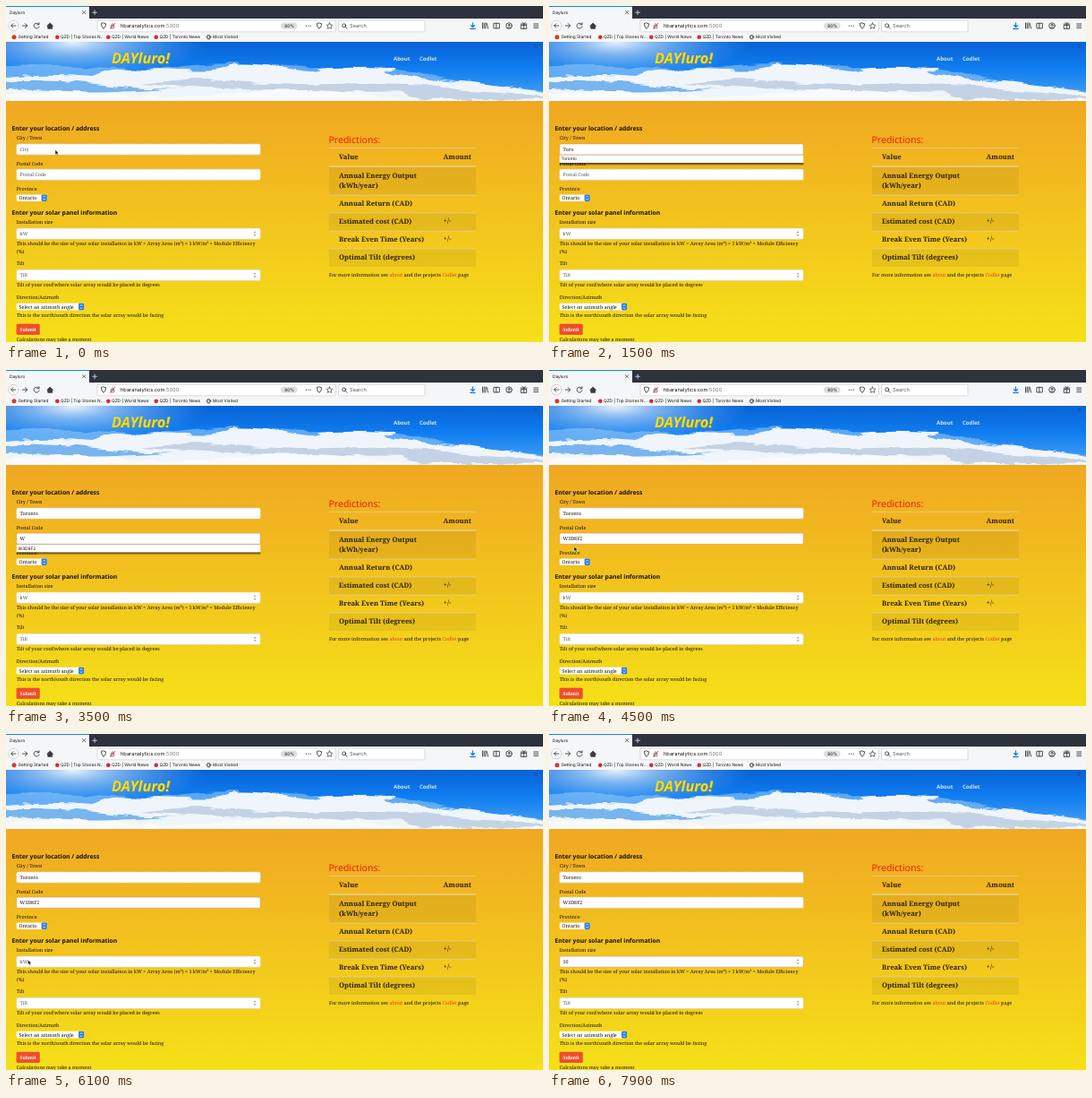
An HTML page for the animation above (8000 ms loop, 600x375 px).

```html
<!DOCTYPE html>
<html lang="en">
<head>
<meta charset="utf-8">
<title>Solar form</title>
<style>
html, body { margin: 0; width: 100%; height: 100%; overflow: hidden; }
svg { display: block; width: 600px; height: 375px; }
text { text-rendering: geometricPrecision; white-space: pre; fill: #15100a; }
.ui { font: 4.75px Inter, sans-serif; }
.url { font-size: 5.7px; }
.body { font: 5.42px "Noto Serif", serif; }
.hint { fill: #54595f; }
.table { font: bold 7.65px "Noto Serif", serif; fill: #2b2009; }
.head { font: bold 6.8px "Noto Sans", sans-serif; }
.nav { font: bold 6.05px "Noto Sans", sans-serif; fill: #cfe3f6; }
.logo { font: italic bold 16.3px "Noto Sans", sans-serif; fill: #f0dc20; text-shadow: .6px .6px .6px #7d8c60; }
.result { font: 500 10.5px "Noto Sans", sans-serif; fill: #f81808; }
.link { fill: #f0381a; }
.icon { fill: none; stroke: #3c3c40; stroke-width: .9; stroke-linecap: round; stroke-linejoin: round; }
</style>
</head>
<body>
<svg id="stage" viewBox="0 0 600 375">
  <defs>
    <linearGradient id="sun" x2="0" y2="1">
      <stop stop-color="#f0a822"/><stop offset="1" stop-color="#f5e018"/>
    </linearGradient>
    <linearGradient id="sky" x2="0" y2="1">
      <stop stop-color="#0862d6"/><stop offset=".45" stop-color="#0f7df0"/><stop offset="1" stop-color="#4ba4f6"/>
    </linearGradient>
    <radialGradient id="glare">
      <stop stop-color="#fff" stop-opacity=".9"/><stop offset=".3" stop-color="#cfe8fd" stop-opacity=".6"/>
      <stop offset="1" stop-color="#6fb8fa" stop-opacity="0"/>
    </radialGradient>
    <linearGradient id="shade" x2="0" y2="1">
      <stop stop-color="#201c14" stop-opacity=".85"/><stop offset="1" stop-color="#201c14" stop-opacity="0"/>
    </linearGradient>
    <filter id="puff" x="-5%" y="-30%" width="110%" height="160%">
      <feTurbulence type="fractalNoise" baseFrequency=".03 .11" numOctaves="4" seed="8"/>
      <feDisplacementMap in="SourceGraphic" scale="9" xChannelSelector="R" yChannelSelector="G"/>
      <feGaussianBlur stdDeviation=".6"/>
    </filter>
    <clipPath id="banner"><path d="M0 40H600V106H0Z"/></clipPath>
  </defs>

  <!-- browser frame -->
  <path fill="#2d323c" d="M0 0H600V14H0Z"/>
  <path fill="#f5f6f7" d="M0 1H93V14H0ZM0 14H600V40H0Z"/>
  <path fill="#0a84ff" d="M0 0H93V1H0Z"/>
  <g class="icon">
    <path d="M85.5 5.5l3.4 3.4m0-3.4l-3.4 3.4" stroke-width=".7"/>
    <path d="M96.8 7.2h4.6m-2.3-2.3v4.6" stroke="#d8d8dc"/>
    <circle cx="8.3" cy="22" r="5.7" fill="#fff" stroke="#b9b9bd" stroke-width=".6"/>
    <path d="M11 22H5.8m2.3-2.4L5.7 22l2.4 2.4"/>
    <path d="M18.5 22h5.2m-2.3-2.4l2.4 2.4-2.4 2.4"/>
    <path d="M36.6 20.3a3 3 0 1 0 .5 2.6M37 18.7v2.1h-2.2"/>
    <path d="M45.9 22.3l3.3-3.2 3.3 3.2M46.8 22.2v3h4.8v-3" fill="#3c3c40"/>
    <rect x="102" y="16" width="266.5" height="12.8" rx="1.5" fill="#fff" stroke="#c5c5ca" stroke-width=".6"/>
    <rect x="371.5" y="16" width="96.5" height="12.8" rx="1.5" fill="#fff" stroke="#c5c5ca" stroke-width=".6"/>
    <path id="shield" d="M109 19l2.6.8q0 3.8-2.6 5.6-2.6-1.8-2.6-5.6z"/>
    <use href="#shield" x="241"/>
    <path d="M117.4 22h3.4v2.8h-3.4zm.6 0v-1.4q1.1-1.8 2.2 0V22" stroke="#77777c"/>
    <path d="M116.8 25.2l4.8-5.8" stroke="#e02030"/>
    <rect x="307" y="18.5" width="18.5" height="7.2" rx="3.6" fill="#dfdfe3" stroke="none"/>
    <path d="M335.5 22.2h0m2.4 0h0m2.4 0h0" stroke-width="1.3"/>
    <path d="M361.5 18.8l1 2.2 2.4.3-1.8 1.6.5 2.4-2.1-1.2-2.1 1.2.5-2.4-1.8-1.6 2.4-.3z" stroke-width=".7"/>
    <path d="M379.3 23.5l1.7 1.7"/><circle cx="377.7" cy="21.8" r="2"/>
    <path d="M521.5 18.8v4.7m-2-2l2 2 2-2M518.8 25.4h5.4" stroke="#0a78e8" stroke-width="1.1"/>
    <path d="M532.5 19v6m1.7-6v6m1.7-6v6m1.2-5.8l1.5 5.8"/>
    <path d="M545.3 19.3h6v5.6h-6zm2.5 0v5.6"/>
    <circle cx="562" cy="22.1" r="3.3"/><circle cx="562" cy="21.3" r=".9"/>
    <path d="M560.1 24.4q1.9-1.8 3.8 0"/>
    <path d="M575.6 21.4h6v4h-6zm-.4-1.3h6.8M578.6 20v5.4m0-5.6l-1.6-1.3m1.6 1.3l1.6-1.3"/>
    <path d="M589.7 20h5m-5 2.2h5m-5 2.2h5"/>
    <circle cx="226.5" cy="34.7" r="1.7"/><circle cx="226.5" cy="34.7" r="2.5" stroke-dasharray="1 .96" stroke-linecap="butt"/>
  </g>
  <circle cx="9" cy="34.7" r="2.5" fill="#d9382a"/>
  <g fill="#d9272e"><circle cx="57.3" cy="34.7" r="2.3"/><circle cx="114.3" cy="34.7" r="2.3"/><circle cx="167.8" cy="34.7" r="2.3"/></g>

  <!-- sky banner -->
  <path fill="url(#sun)" d="M0 106H600V375H0Z"/>
  <g clip-path="url(#banner)">
    <path fill="url(#sky)" d="M0 40H600V106H0Z"/>
    <ellipse cx="75" cy="41" rx="150" ry="42" fill="url(#glare)"/>
    <g filter="url(#puff)">
      <path fill="#8fc6f8" opacity=".6" d="M-10 68Q40 64 100 68T200 67 300 66 390 68 470 77 610 95V115H-10Z"/>
      <path fill="#f0f5fb" d="M-10 80Q40 74 95 79L120 72Q160 69 200 71T250 67 310 69 350 72 395 68 430 72 460 80 510 84 560 90 610 97V115H-10Z"/>
      <path fill="#5ba6ec" opacity=".8" d="M-10 87Q40 80 100 87T190 92Q100 99 50 95T-10 97Z"/>
      <path fill="#b4c8de" opacity=".75" d="M150 87Q210 79 270 84T400 86 510 95Q400 99 290 94T150 87ZM440 96Q520 91 600 102V106H470Z"/>
      <path fill="#f8fafc" d="M-10 99Q70 94 130 99T270 97 400 99 610 104V115H-10Z"/>
    </g>
    <path stroke="#173a66" stroke-width=".8" d="M590 43.8h1.6m1 0h1.6m-2.6 2.2h1.6"/>
  </g>

  <!-- results table -->
  <path fill="#000" fill-opacity=".06" d="M361 180H525V211H361ZM361 231H525V251H361ZM361 271H525V291H361Z"/>
  <path stroke="#e0d6bd" stroke-width=".6" d="M361 158.4H525M361 211H525M361 231H525M361 251H525M361 271H525"/>
  <path stroke="#e0dccb" stroke-width="1.1" d="M361 179H525"/>
  <g id="page"></g>
  <g id="menu">
    <rect x="11.8" y="8.8" width="272.6" height="3.4" fill="url(#shade)"/>
    <rect x="11.8" width="272.4" height="8.8" fill="#fff"/>
    <path stroke="#8a8578" stroke-width=".4" d="M11.8 0H284.2"/>
    <text id="option" class="ui" x="13.5" y="6"></text>
  </g>
  <path id="arrow" fill="#111" stroke="#fff" stroke-width=".45" d="M0 0V5.4L1.3 4.3 2.2 6.4 3.2 6 2.3 3.9H4Z"/>
  <path id="beam" class="icon" stroke-width=".6" d="M-1.2-3.4Q0-3.4 0-2.5V2.5Q0 3.4-1.2 3.4M1.2-3.4Q0-3.4 0-2.5M0 2.5Q0 3.4 1.2 3.4M-.8 1H.8"/>
</svg>
<script>
const $ = id => document.getElementById(id);
const page = $("page");

function add(tag, attrs, content = "") {
  const el = document.createElementNS("http://www.w3.org/2000/svg", tag);
  for (const key in attrs) el.setAttribute(key, attrs[key]);
  el.innerHTML = content;
  page.append(el);
  return el;
}
const write = (cls, x, y, content) => add("text", { class: cls, x, y }, content);

function field(y, hint, spinner) {
  const box = add("rect", { x: 11.8, y, width: 272.4, height: 12.2, rx: 1.5, fill: "#fff", "stroke-width": .6 });
  if (spinner) add("path", { d: `M276.6 ${y + 5.2}l1.5-2 1.5 2zm0 1.9l1.5 2 1.5-2z`, fill: "#a0a0a0" });
  const label = write("body", 15.5, y + 7.9, hint);
  return (value, focused) => {
    label.textContent = value || hint;
    label.setAttribute("class", value ? "body" : "body hint");
    box.setAttribute("stroke", focused ? "#d98f62" : "#d8cfb8");
  };
}

function select(y, width, value) {
  add("rect", { x: 11.8, y, width, height: 7.6, rx: 1.4, fill: "#fff" });
  const x = 11.8 + width - 6.2;
  add("rect", { x, y, width: 6.2, height: 7.6, rx: 1.4, fill: "#2f7de0" });
  add("path", { d: `M${x + 1.8} ${y + 3.1}l1.3-1.5 1.3 1.5m-2.6 1.5l1.3 1.5 1.3-1.5`, fill: "none", stroke: "#fff", "stroke-width": .7 });
  write("body", 14.6, y + 5.7, value).style.fontWeight = 500;
}

// browser labels
write("ui", 4, 9, "Dayluro");
write("ui url", 128, 24.2, 'hbaranalytics.com<tspan fill="#77777c">:5000</tspan>');
write("ui", 311.3, 23.8, "80%");
write("ui url hint", 384, 24.2, "Search");
[[13.4, "Getting Started"], [61, "QZD | Top Stories N..."], [118, "QZD | World News"],
 [171.5, "QZD | Toronto News"], [231, "Most Visited"]].forEach(([x, s]) => write("ui", x, 36.4, s));

// banner labels
write("logo", 118, 64.3, "DAYluro!");
write("nav", 433, 60.6, "About");
write("nav", 462, 60.6, "Codlet");

// form
write("head", 6.5, 139.2, "Enter your location / address");
write("head", 6.5, 233, "Enter your solar panel information");
[[149, "City / Town"], [177.5, "Postal Code"], [205.8, "Province"], [243, "Installation size"],
 [267, "This should be the size of your solar installation in kW = Array Area (m²) × 1 kW/m² × Module Efficiency"],
 [276, "(%)"], [289.3, "Tilt"], [313.4, "Tilt of your roof/where solar array would be placed in degrees"],
 [327, "Direction/Azimuth"], [347, "This is the north/south direction the solar array would be facing"],
 [373.6, "Calculations may take a moment"]].forEach(([y, s]) => write("body", 11.8, y, s));
const city = field(153.9, "City");
const postal = field(182.1, "Postal Code");
const size = field(248, "kW", true);
field(294.2, "Tilt", true)("", false);
select(210.4, 34, "Ontario");
select(331.8, 75.4, "Select an azimuth angle");
add("rect", { x: 11.6, y: 354.8, width: 26.2, height: 12.2, rx: 1.5, fill: "#f04e2c" });
const submit = write("body", 15.6, 362.7, "Submit");
submit.style.cssText = "fill:#fff;font-weight:bold;font-size:5px";

// results
write("result", 360.5, 153, "Predictions:");
[[372, 171.4, "Value"], [488.6, 171.4, "Amount"], [372, 191.5, "Annual Energy Output"], [372, 203.4, "(kWh/year)"],
 [372, 223.3, "Annual Return (CAD)"], [372, 243.4, "Estimated cost (CAD)"],
 [372, 263.4, "Break Even Time (Years)"], [372, 283.4, "Optimal Tilt (degrees)"]]
  .forEach(([x, y, s]) => write("table", x, y, s));
[241.8, 261.8].forEach(y => write("body", 488.8, y, "+/-").style.fontSize = "7.4px");
write("body", 361, 302.4, 'For more information see <tspan class="link">about</tspan> and the projects <tspan class="link">Codlet</tspan> page');

// [time, value] steps
const cityKeys = [[0, ""], [1000, "T"], [1200, "To"], [1300, "Tor"], [1500, "Toro"], [2100, "Toronto"]];
const postalKeys = [[0, ""], [3300, "W"], [4000, "W3D8F2"]];
const sizeKeys = [[0, ""], [7300, "1"], [7500, "10"]];
const path = [[0, 55, 160.5], [4200, 55, 160.5], [4500, 28, 197], [5000, 31, 213],
              [5500, 33, 227], [6200, 24, 253.5], [8000, 24, 253.5]];

const valueAt = (keys, t) => keys.findLast(k => k[0] <= t)[1];
const within = (t, a, b) => t >= a && t < b;

function pointAt(t) {
  const i = path.findIndex(p => p[0] > t);
  const [a, b] = [path[i - 1], path[i]];
  const u = (t - a[0]) / (b[0] - a[0]);
  const ease = u * u * (3 - 2 * u);
  return [1, 2].map(k => a[k] + (b[k] - a[k]) * ease);
}

function show(id, visible, x, y) {
  $(id).style.display = visible ? "" : "none";
  $(id).setAttribute("transform", `translate(${x} ${y})`);
}

let last = -1;
function draw() {
  const t = Math.floor(performance.now() % 8000 / 100) * 100;
  if (t !== last) {
    last = t;
    city(valueAt(cityKeys, t), within(t, 400, 2800));
    postal(valueAt(postalKeys, t), within(t, 2800, 6400));
    size(valueAt(sizeKeys, t), t >= 6400);
    const first = within(t, 1000, 2100);
    $("option").textContent = first ? "Toronto" : "W3D8F2";
    show("menu", first || within(t, 3300, 4000), 0, first ? 166.2 : 194.5);
    const [x, y] = pointAt(t);
    const beam = within(t, 5200, 6100);
    show("arrow", !beam && (t < 1000 || within(t, 4200, 7300)), x, y);
    show("beam", beam, x, y);
  }
  requestAnimationFrame(draw);
}
draw();
</script>
</body>
</html>
```
